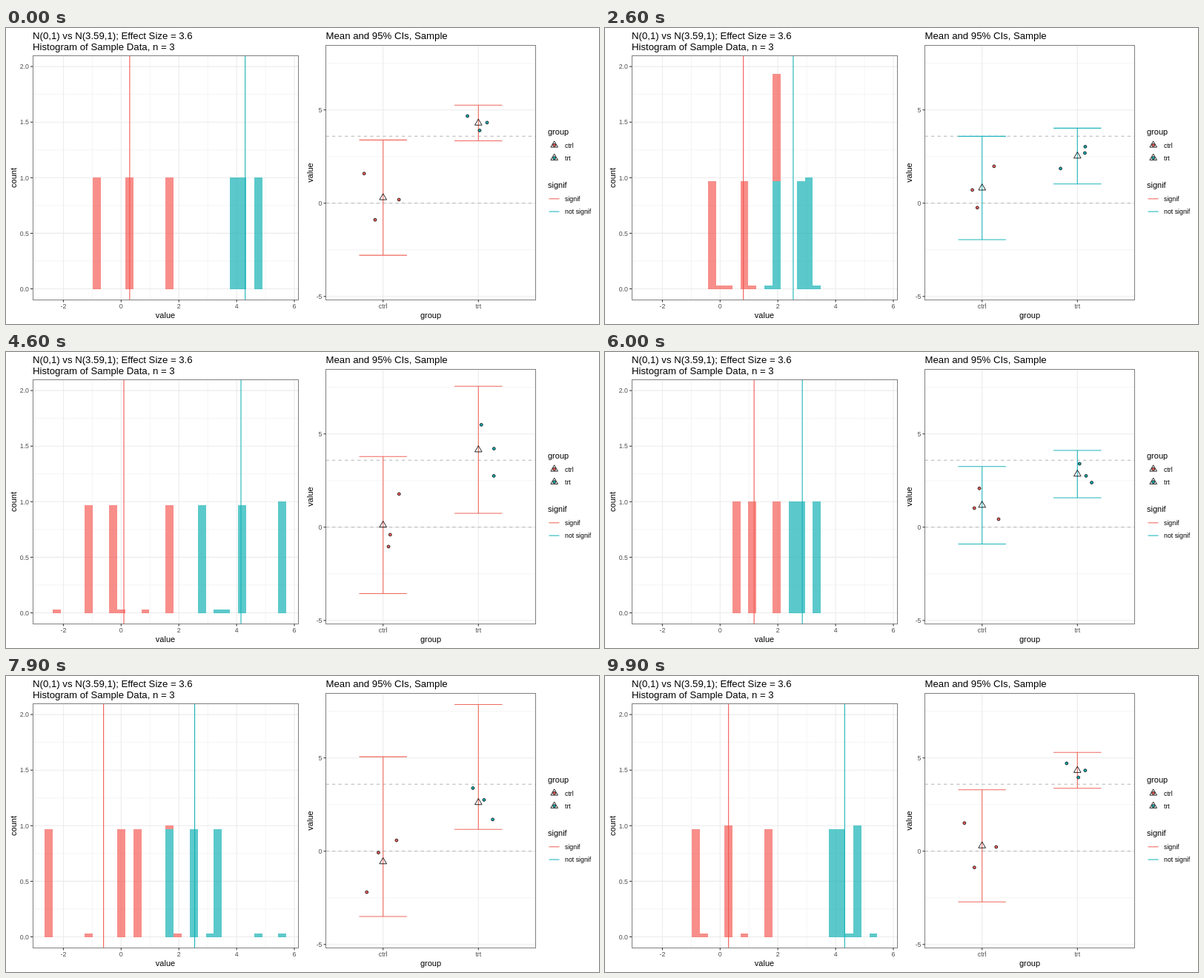
Animation, 800 px wide and 400 px high, one loop 10000 ms. Source, as an HTML page:

```html
<!DOCTYPE html>
<html lang="en">
<head>
<meta charset="utf-8">
<title>Sample data and confidence intervals</title>
<style>
html, body { margin: 0; width: 100%; height: 100%; overflow: hidden; background: #fff; }
svg { display: block; width: 800px; height: 400px; font-family: "Liberation Sans", Arial, sans-serif; }
.title { font-size: 13.2px; }
.label { font-size: 11px; }
.tick { font-size: 8.8px; fill: #4d4d4d; }
.key { font-size: 8.8px; }
</style>
</head>
<body>
<svg id="stage" viewBox="0 0 800 400"></svg>
<script>
const RED = '#f0685e', TEAL = '#1eb5bc', GRID = '#ebebeb';
const GROUPS = [
  { name: 'ctrl', x: 508.7, fill: '#f55e59', line: '#f3544f' },
  { name: 'trt', x: 637.3, fill: '#16b2b5', line: '#14b0b5' }
];
// Each sample draws three ctrl and three trt values; all else is computed.
const SAMPLES = [
  [[1.59, .19, -.89], [4.67, 4.32, 3.9]],
  [[.6, -.45, .15], [4.15, 3.05, 3.7]],
  [[1.98, .71, -.24], [3.03, 2.69, 1.86]],
  [[1.12, .28, 0], [3.35, 3.07, 1.67]],
  [[1.78, -.4, -1.04], [5.49, 4.21, 2.75]],
  [[.84, 0, -2.23], [5.58, 3.63, 3.35]],
  [[2.08, 1.02, .43], [3.4, 2.75, 2.39]],
  [[1.95, 1.59, -1.2], [5.66, 4.86, 3.03]],
  [[.49, -2.45, 0], [3.23, 2.61, 1.61]],
  [[.29, .79, -.59], [5.28, 4.47, 4.76]]
];
const BINS = 30, BIN_X = 52, BIN_W = 10.875;

const histX = v => 155.3 + 38.95 * v;
const histY = n => 352.5 - 150.2 * n;
const ciY = v => 236.75 - 25.21 * v;
const mix = (a, b, p) => a + (b - a) * p;
const cubic = t => t < .5 ? 4 * t ** 3 : 1 - 4 * (1 - t) ** 3;

let seed = 7;
function random() {
  seed = (seed * 16807) % 2147483647;
  return seed / 2147483647;
}

const stage = document.getElementById('stage');
function set(el, attrs) {
  for (const k in attrs) el.setAttribute(k, attrs[k]);
}
function add(tag, attrs) {
  const el = document.createElementNS('http://www.w3.org/2000/svg', tag);
  set(el, attrs);
  return stage.appendChild(el);
}
function line(x1, y1, x2, y2, stroke, more = {}) {
  return add('line', { x1, y1, x2, y2, stroke, 'stroke-width': 1.07, ...more });
}
function grid(x1, y1, x2, y2, minor) {
  line(x1, y1, x2, y2, GRID, { 'stroke-width': minor ? .55 : 1.07 });
}
function text(str, x, y, cls, anchor = 'start', more = {}) {
  add('text', { x, y, class: cls, 'text-anchor': anchor, ...more }).textContent = str;
}
function vertical(str, x, y) {
  text(str, x, y, 'label', 'middle', { transform: `rotate(-90 ${x} ${y})` });
}
function xTick(str, x) {
  line(x, 367.5, x, 370.5, '#333');
  text(str, x, 379.3, 'tick', 'middle');
}
function yTick(str, x, y) {
  line(x - 3, y, x, y, '#333');
  text(str, x - 5, y + 3.2, 'tick', 'end');
}
const dot = fill => add('circle', { r: 1.95, fill, stroke: '#000', 'stroke-width': .8 });
const triangle = () => add('path', {
  d: 'M0-5.5L4.8 2.8H-4.8Z', fill: 'none', stroke: '#000', 'stroke-width': .85
});
const at = (x, y) => ({ transform: `translate(${x} ${y})` });

function summarize(values) {
  const mean = values.reduce((s, v) => s + v) / 3;
  const variance = values.reduce((s, v) => s + (v - mean) ** 2, 0) / 2;
  const half = 4.303 * Math.sqrt(variance / 3);
  const counts = Array(BINS).fill(0);
  values.forEach(v => counts[Math.floor((histX(v) - BIN_X) / BIN_W)]++);
  const jitter = values.map(() => 51 * (random() - .5));
  return { values, jitter, counts, mean, error: variance / 3, low: mean - half, high: mean + half };
}

// Welch's t-test at the 5% level, with a series for the critical value.
function isSignif([a, b]) {
  const error = a.error + b.error;
  const df = 2 * error ** 2 / (a.error ** 2 + b.error ** 2);
  const critical = 1.96 + 2.372 / df + 2.82 / df ** 2 + 2.55 / df ** 3;
  return Math.abs(a.mean - b.mean) / Math.sqrt(error) > critical;
}

const states = SAMPLES.map(sample => {
  const groups = sample.map(summarize);
  return { groups, color: isSignif(groups) ? RED : TEAL };
});

// Grids
for (let v = -3; v <= 6; v++) grid(histX(v), 37.5, histX(v), 367.5, v % 2);
for (let n = 0; n <= 8; n++) grid(36, histY(n / 4), 394, histY(n / 4), n % 2);
for (let v = -5; v <= 7.5; v += 2.5) grid(431.5, ciY(v), 714.5, ciY(v), v % 5);
GROUPS.forEach(g => grid(g.x, 23.5, g.x, 367.5));

// Moving parts
const bars = GROUPS.map(g => Array.from({ length: BINS }, (_, k) => add('rect', {
  x: BIN_X + k * BIN_W, width: BIN_W, fill: g.fill, 'fill-opacity': .7, 'shape-rendering': 'crispEdges'
})));
const means = GROUPS.map(g => line(0, 37.5, 0, 367.5, g.line));
[0, 3.59].forEach(v => line(431.5, ciY(v), 714.5, ciY(v), '#b5b5b5', { 'stroke-dasharray': '4.27' }));
const ranges = GROUPS.map(() => add('path', { fill: 'none', 'stroke-width': 1.07 }));
const dots = GROUPS.map(g => [0, 1, 2].map(() => dot(g.fill)));
const marks = GROUPS.map(triangle);

// Frames, axes and labels
const frame = (x, y, width, height) => add('rect', { x, y, width, height, fill: 'none', stroke: '#7f7f7f' });
frame(36.5, 37.5, 358, 330);
frame(431.5, 23.5, 283, 344);
for (let v = -2; v <= 6; v += 2) xTick(v, histX(v));
for (let n = 0; n <= 2; n += .5) yTick(n.toFixed(1), 36, histY(n));
for (let v = -5; v <= 5; v += 5) yTick(v, 431.5, ciY(v));
GROUPS.forEach(g => xTick(g.name, g.x));
text('N(0,1) vs N(3.59,1); Effect Size = 3.6', 36, 15, 'title');
text('Histogram of Sample Data, n = 3', 36, 30, 'title');
text('Mean and 95% CIs, Sample', 431.5, 15, 'title');
text('value', 215, 392, 'label', 'middle');
text('group', 573, 392, 'label', 'middle');
vertical('count', 13.5, 202.5);
vertical('value', 413.5, 195.5);

// Legends
text('group', 731, 144, 'label');
text('signif', 731, 216, 'label');
GROUPS.forEach((g, i) => {
  const y = 158.3 + 17.28 * i;
  set(dot(g.fill), at(739.7, y));
  set(triangle(), at(739.7, y));
  text(g.name, 754, y + 3.4, 'key');
});
[['signif', RED], ['not signif', TEAL]].forEach(([name, color], i) => {
  const y = 230.8 + 17.28 * i;
  line(732.5, y, 746.5, y, color);
  text(name, 754, y + 3.4, 'key');
});

// A state rests for six ticks, then eases into the next one.
function draw(tick) {
  const i = Math.floor(tick / 10), step = Math.max(0, tick % 10 - 5);
  const from = states[i], to = states[(i + 1) % states.length];
  const p = cubic(step / 5), q = cubic(Math.max(0, step - 1) / 4);
  // Intervals only glide when significance stays the same.
  const r = from.color === to.color ? q : 0;

  GROUPS.forEach((g, n) => {
    const a = from.groups[n], b = to.groups[n];
    bars[n].forEach((bar, k) => {
      const count = s => mix(from.groups[s].counts[k], to.groups[s].counts[k], p);
      const h = count(n), base = n ? 0 : count(1);
      set(bar, { y: histY(base + h), height: histY(0) - histY(h) });
    });
    const x = histX(mix(a.mean, b.mean, p));
    set(means[n], { x1: x, x2: x });

    const top = ciY(mix(a.high, b.high, r)), bottom = ciY(mix(a.low, b.low, r));
    const left = g.x - 32.2;
    set(ranges[n], {
      d: `M${left} ${top}h64.4M${g.x} ${top}V${bottom}M${left} ${bottom}h64.4`,
      stroke: from.color
    });
    dots[n].forEach((d, k) => set(d, at(
      g.x + mix(a.jitter[k], b.jitter[k], q),
      ciY(mix(a.values[k], b.values[k], q))
    )));
    set(marks[n], at(g.x, ciY(mix(a.mean, b.mean, q))));
  });
}

let last = -1;
const start = performance.now();
function loop() {
  const tick = Math.floor((performance.now() - start) % 10000 / 100);
  if (tick !== last) draw(last = tick);
  requestAnimationFrame(loop);
}
loop();
</script>
</body>
</html>
```
